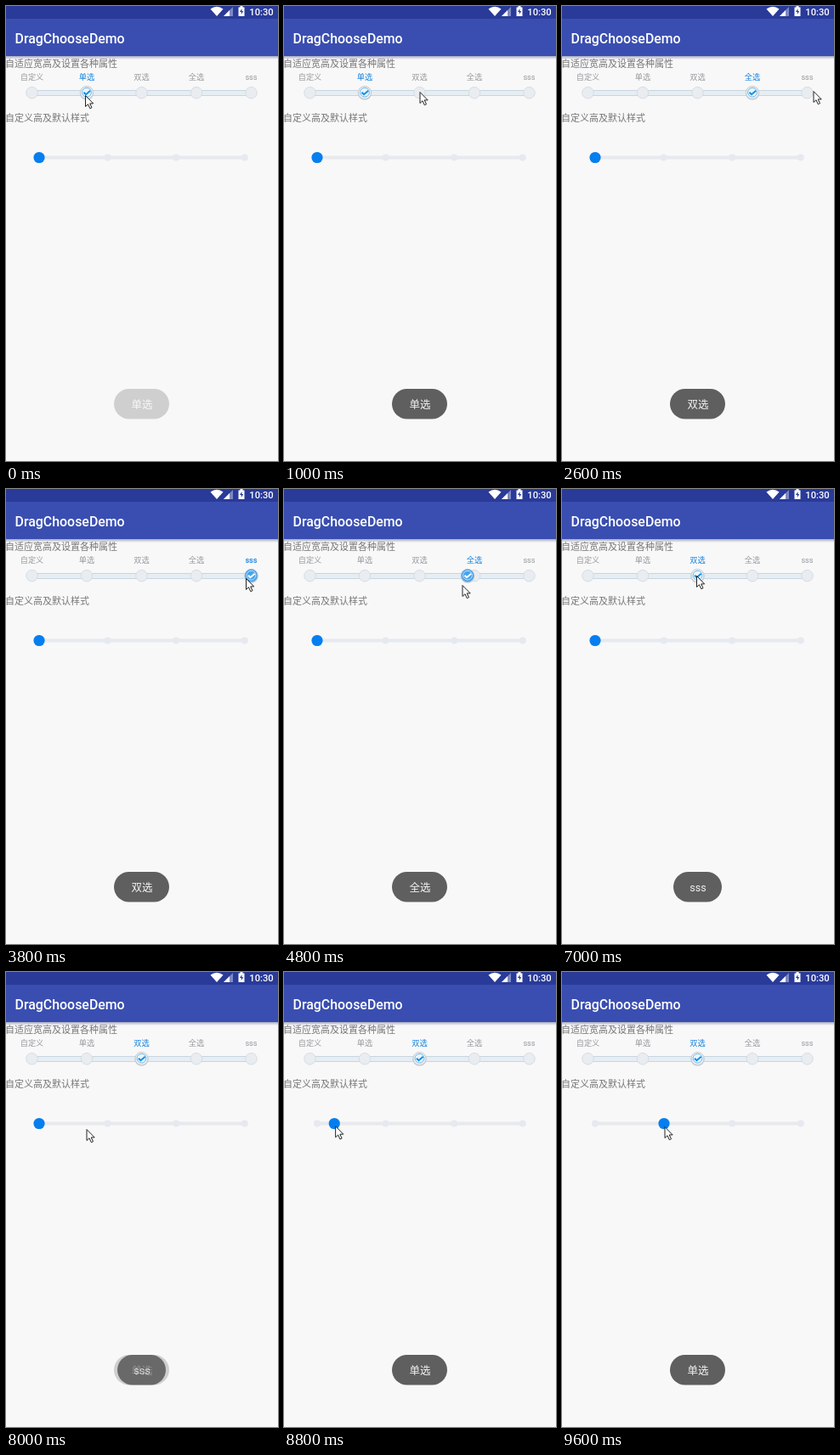
An HTML page for the animation above (9.8 s loop, 320 px wide and 536 px high).

```html
<!DOCTYPE html>
<html lang="zh-CN">
<head>
<meta charset="utf-8">
<style>
html, body { margin: 0; width: 100%; height: 100%; overflow: hidden; background: #f8f8f8; }
svg { display: block; font-family: Roboto, "Noto Sans CJK SC", "Noto Sans CJK", sans-serif; }
.note { font-size: 11px; fill: #767676; }
.label { font-size: 9.2px; fill: #989a9e; text-anchor: middle; }
.label.on { fill: #1583df; font-weight: 500; }
.toast text { font-size: 12.5px; fill: #f2f2f2; text-anchor: middle; }
#thumb .disc { fill: #f1f4f6; stroke: #c3cbd3; }
#thumb .ring { fill: #eaf5fc; stroke: #6ab6e8; }
#thumb .tick { stroke: #158fe2; }
#thumb.down .disc { fill: #3d9fea; stroke: #9eb9d4; }
#thumb.down .ring { fill: #45a5ed; stroke: #c5e4fa; }
#thumb.down .tick { stroke: #fff; }
</style>
</head>
<body>
<svg width="320" height="536" viewBox="0 0 320 536">
  <defs>
    <linearGradient id="shade" x2="0" y2="1">
      <stop stop-color="#a9adc0"/><stop offset="1" stop-color="#f8f8f8"/>
    </linearGradient>
  </defs>
  <rect width="320" height="536" fill="#f8f8f8"/>
  <rect y="59" width="320" height="4" fill="url(#shade)"/>
  <rect width="320" height="59" fill="#3a4eb1"/>
  <rect width="320" height="15" fill="#293a98"/>
  <g fill="#fff">
    <path d="M240.500 3.500Q248 -2 255.500 3.500L248 12Z"/>
    <path d="M267 1V12H256Z" opacity=".4"/>
    <path d="M263 5V12H256Z"/>
    <path d="M273.500 1.500H275.500V0H278.500V1.500H280.500V12H273.500Z"/>
    <path d="M277.500 3L275 7H276.800V10L279.200 6H277.500Z" fill="#293a98"/>
    <text x="286.300" y="11" font-size="11.200" font-weight="500">10:30</text>
    <text x="10.500" y="44" font-size="15.900" font-weight="500">DragChooseDemo</text>
  </g>
  <text class="note" x="-1" y="72">自适应宽高及设置各种属性</text>
  <text class="note" x="-1" y="136">自定义高及默认样式</text>

  <g id="steps">
    <rect x="30" y="99.500" width="259" height="6" fill="#e7eef3" stroke="#c9d6e0"/>
  </g>
  <g id="thumb">
    <circle cy=".6" r="8.200" fill="#c9ced4"/>
    <circle class="disc" r="7.500"/>
    <circle class="ring" cy="-.3" r="5.400"/>
    <path class="tick" d="M-3.500 -.2L-1 2.200L4.200 -2.300" fill="none" stroke-width="2"/>
  </g>

  <g id="dots" fill="#e7e9f0"><rect x="39" y="176.500" width="242" height="4"/></g>
  <circle id="knob" cy="178.500" r="6.600" fill="#057ef0"/>

  <g id="toasts"></g>
  <path id="cursor" d="M.5 .5V13.500L3.500 10.700L5.800 15.700L8 14.700L5.700 9.900H9.700Z" fill="#fff" stroke="#222"/>
</svg>
<script>
const LOOP = 9800, STEP = 200, FADE = 500;
const names = ['自定义', '单选', '双选', '全选', 'sss'];
const stops = names.map((_, i) => 30.5 + 64.5 * i);
const [, s1, s2, s3, s4] = stops;

// Keys are [time, ...values]; repeated times make a jump.
const cursorKeys = [
  [0, 93, 105], [400, 93, 105], [1000, 159.5, 101], [1400, 160, 101], [2000, 226, 102],
  [2600, 295.5, 100], [3000, 295, 101], [3800, 282, 105], [4800, 209.5, 113],
  [5400, 89, 120], [6000, 89.5, 130], [6800, 158, 102], [7200, 158, 102],
  [8000, 94.5, 185], [8400, 40, 181], [8600, 40, 181], [9400, 120.5, 182], [LOOP, 120.5, 182]
];
const thumbKeys = [
  [0, s1], [1200, s1], [1200, s2], [2000, s2], [2000, s3], [2800, s3], [2800, s4],
  [3800, s4], [4800, 216], [5400, s1], [7000, s1], [7000, s2], [LOOP, s2]
];
const knobKeys = [[0, 39], [8600, 39], [9400, 120], [LOOP, 120]];
// [text, fade in, fade out]
const toastTimes = [
  ['单选', -130, 1950], ['双选', 2000, 3950], ['全选', 4000, 5950],
  ['sss', 6000, 7950], ['单选', 7870, LOOP]
];

const $ = id => document.getElementById(id);
function add(parent, tag, attrs, text = '') {
  const el = document.createElementNS('http://www.w3.org/2000/svg', tag);
  for (const key in attrs) el.setAttribute(key, attrs[key]);
  el.textContent = text;
  return parent.appendChild(el);
}
const clamp = v => Math.max(0, Math.min(1, v));
function valueAt(keys, t) {
  const i = Math.max(1, keys.findIndex(k => k[0] > t));
  const [a, b] = [keys[i - 1], keys[i]];
  const p = (t - a[0]) / (b[0] - a[0]);
  return a.slice(1).map((v, n) => v + (b[n + 1] - v) * p);
}

const labels = names.map((name, i) => {
  add($('steps'), 'circle', { cx: stops[i], cy: 102.2, r: 6.8, fill: '#e9ecf0', stroke: '#d0d8e0', 'stroke-width': .8 });
  return add($('steps'), 'text', { class: 'label', x: stops[i], y: 87.3 }, name);
});
for (let i = 0; i < 4; i++) add($('dots'), 'circle', { cx: 39 + 80.6 * i, cy: 178.5, r: 4 });
const toasts = toastTimes.map(([text]) => {
  const width = text === 'sss' ? 57 : 65;
  const group = add($('toasts'), 'g', { class: 'toast' });
  add(group, 'rect', { x: 159.5 - width / 2, y: 451, width, height: 35.5, rx: 17.7, fill: '#5f5f5f' });
  add(group, 'text', { x: 160, y: 473.7 }, text);
  return group;
});

function draw(now) {
  const t = Math.floor(now % LOOP / STEP) * STEP;
  const [x] = valueAt(thumbKeys, t);
  const chosen = Math.round((x - stops[0]) / 64.5);
  labels.forEach((el, i) => el.classList.toggle('on', i === chosen));
  $('thumb').setAttribute('transform', `translate(${x} 102)`);
  $('thumb').classList.toggle('down', t >= 3800 && t < 5400);
  $('knob').setAttribute('cx', valueAt(knobKeys, t)[0]);
  $('cursor').setAttribute('transform', `translate(${valueAt(cursorKeys, t)})`);
  toastTimes.forEach(([, from, to], i) => {
    const alpha = Math.min(clamp((t - from) / FADE), 1 - clamp((t - to) / FADE));
    toasts[i].setAttribute('opacity', alpha);
  });
}
const start = performance.now();
(function tick() {
  draw(performance.now() - start);
  requestAnimationFrame(tick);
})();
</script>
</body>
</html>
```
